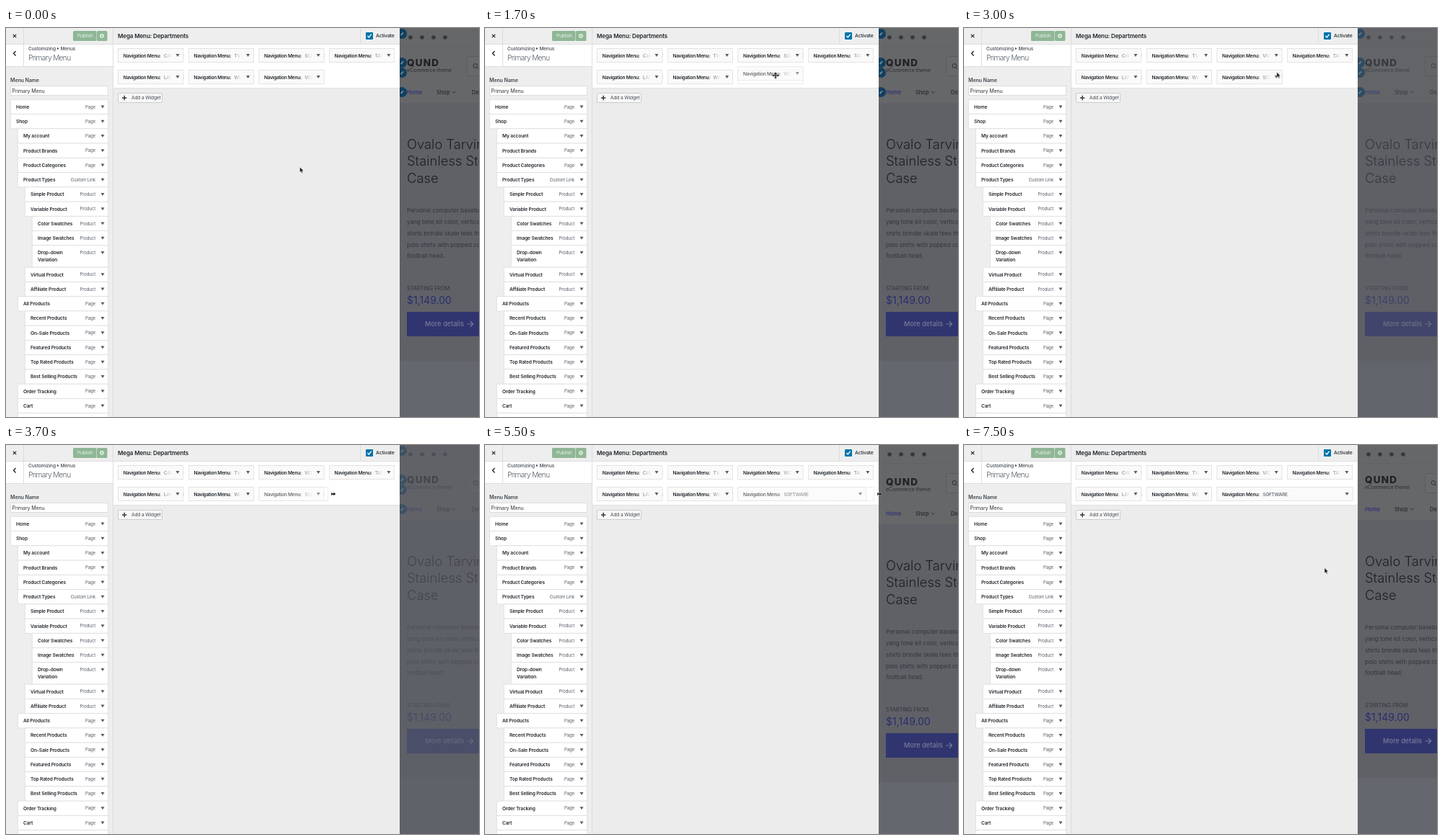
Animation of 656 by 540 pixels, one loop 7600 ms. Source, as an HTML page:

```html
<!DOCTYPE html>
<html lang="en">
<head>
<meta charset="utf-8">
<title>Mega menu editor</title>
<style>
html, body { margin: 0; width: 100%; height: 100%; overflow: hidden; background: #eee; }
#stage { display: block; width: 656px; height: 540px; font-family: Inter, "Open Sans", sans-serif; }
text { white-space: pre; letter-spacing: -.02em; }
.wide text { letter-spacing: 0; }
.tight text { letter-spacing: -.04em; }
</style>
</head>
<body>
<svg id="stage" viewBox="0 0 656 540" xmlns="http://www.w3.org/2000/svg"></svg>
<script>
const LOOP = 7600;
const INK = '#23282d';

// markup helpers; text is placed by its left edge and middle
const text = (x, y, s, size, fill = INK, weight = 400, extra = '') =>
  `<text x="${x}" y="${y + size * .36}" font-size="${size}" fill="${fill}" font-weight="${weight}" ${extra}>${s}</text>`;
const rect = (x, y, w, h, fill, extra = '') =>
  `<rect x="${x}" y="${y}" width="${w}" height="${h}" fill="${fill}" ${extra}/>`;
const box = (x, y, w, h, fill, stroke, extra = '') =>
  rect(x + .5, y + .5, w - 1, h - 1, fill, `stroke="${stroke}" ${extra}`);
const line = (d, stroke, width = 1, extra = '') =>
  `<path d="${d}" fill="none" stroke="${stroke}" stroke-width="${width}" ${extra}/>`;
const down = (x, y, fill = '#555d66') =>
  `<path d="M${x - 2.5} ${y - 2}h5l-2.5 4z" fill="${fill}"/>`;
const dot = (x, y, r, fill) => `<circle cx="${x}" cy="${y}" r="${r}" fill="${fill}"/>`;

// menu tree: depth, label, type
const items = [
  [0, 'Home', 'Page'], [0, 'Shop', 'Page'], [1, 'My account', 'Page'],
  [1, 'Product Brands', 'Page'], [1, 'Product Categories', 'Page'],
  [1, 'Product Types', 'Custom Link'], [2, 'Simple Product', 'Product'],
  [2, 'Variable Product', 'Product'], [3, 'Color Swatches', 'Product'],
  [3, 'Image Swatches', 'Product'], [3, 'Drop-down|Variation', 'Product'],
  [2, 'Virtual Product', 'Product'], [2, 'Affiliate Product', 'Product'],
  [1, 'All Products', 'Page'], [2, 'Recent Products', 'Page'],
  [2, 'On-Sale Products', 'Page'], [2, 'Featured Products', 'Page'],
  [2, 'Top Rated Products', 'Page'], [2, 'Best Selling Products', 'Page'],
  [1, 'Order Tracking', 'Page'], [1, 'Cart', 'Page'], [1, 'Checkout', 'Page']
];

function menuTree() {
  let y = 99.3, out = '';
  for (const [depth, label, type] of items) {
    const x = 6 + depth * 10, rows = label.split('|'), h = 20.25 + (rows.length - 1) * 10.1;
    out += rect(x + .25, y, 135.5 - depth * 10, h, '#fff', 'stroke="#dcdcdc" stroke-width=".8"');
    rows.forEach((row, i) => out += text(x + 8, y + 10.1 + i * 10.1, row, 6.58, INK, 600));
    out += text(124, y + 10.1, type, 6.07, '#555d66', 400, 'text-anchor="end"') + down(134, y + 10.1);
    y += h;
  }
  return out;
}

function sidebar() {
  return rect(0, 0, 149, 540, '#eee') +
    rect(0, 23, 148, 30, '#fff') +
    line('M0 22.5H148M0 53.5H148M24.5 0V53M148.5 0V540', '#ddd') +
    line('M9.8 8.8l4.4 4.4m0-4.4l-4.4 4.4', INK, 1.2) +
    line('M13.5 32l-3 3.2 3 3.2', INK, 1.4) +
    rect(93, 4, 32.5, 14, '#8fb795', 'rx="1.5"') + rect(126, 4, 14.5, 14, '#8fb795', 'rx="1.5"') +
    text(99, 11, 'Publish', 6.58, '#eaf3ec', 400) +
    `<circle cx="133" cy="11" r="1.8" fill="none" stroke="#eaf3ec" stroke-width="1.3"/>` +
    `<circle cx="133" cy="11" r="2.9" fill="none" stroke="#eaf3ec" stroke-dasharray="1.2 1.08"/>` +
    text(31, 28.5, 'Customizing', 6.58, '#444b52', 500) +
    `<path d="M71 26.7l2.5 1.8-2.5 1.8z" fill="#444b52"/>` +
    text(75.5, 28.5, 'Menus', 6.58, '#444b52', 500) +
    text(31, 41.5, 'Primary Menu', 10.1, '#555d66', 300, 'style="letter-spacing:-.06em"') +
    text(6, 72.7, 'Menu Name', 7.08, '#444b52', 600) +
    box(6, 80, 136, 14, '#fff', '#ddd') +
    text(8.5, 87, 'Primary Menu', 7.08, '#32373c') +
    menuTree();
}

function panel() {
  return rect(149, 0, 397, 540, '#ececec') +
    rect(149, 0, 397, 22, '#eee') + rect(149, 23, 397, 60.5, '#fff') +
    line('M149 22.5H546M491.5 0V22', '#ddd') + line('M149 83.5H546', '#e2e2e2') +
    text(155, 11, 'Mega Menu: Departments', 8.1, INK, 600) +
    rect(499, 6, 10, 10, '#0073aa', 'rx="1"') +
    line('M501.4 11l1.9 2 3.4-4.3', '#fff', 1.3) +
    text(513, 11, 'Activate', 6.8, INK, 500) +
    box(155, 90, 62, 14, '#f7f7f7', '#ccc', 'rx="1.5"') +
    line('M161 97h6.4m-3.2-3.2v6.4', '#32373c', 1.4) +
    text(174, 97, 'Add a Widget', 6.58, '#444b52', 400);
}

// the site behind the dark overlay; d is the extra header height, tools shows the edit buttons
function preview(d, tools) {
  const k = d / 2;
  const title = ['Ovalo Tarvin', 'Stainless Steel', 'Case'];
  const body = ['Personal computer baseball', 'yang tone kit color, vertical', 'shirts brindle skate tees the',
    'polo shirts with popped collar', 'football head.'];
  let s = rect(546, 0, 110, 540, '#666769') +
    rect(546, 104 + d, 110, 358, '#606167') + rect(546, 462 + d, 110, 80, '#65676f') +
    [561, 577, 593, 609].map(x => dot(x, 13, 2.8, '#35373c')).join('') +
    line('M546 25.5H656', '#626366') +
    text(556, 48 + k, 'QUND', 13.5, '#202126', 800, 'style="letter-spacing:1.2px"') +
    text(556, 59 + k, 'eCommerce theme', 6.9, '#2b2d32') +
    box(639, 39, 30, 28, '#68696b', '#5b5c60', 'rx="3"') +
    `<circle cx="651" cy="52.4" r="2.8" fill="none" stroke="#2d2f34"/>` + line('M653 54.5l2 2', '#2d2f34') +
    text(556, 89 + d, 'Home', 7.5, '#2b3175', 500) +
    text(597, 89 + d, 'Shop', 7.5, '#27292e', 500) +
    line(`M619 ${88 + d}l2.2 2.2 2.2-2.2`, '#27292e') +
    text(646, 89 + d, 'Deals', 7.5, '#27292e', 500);
  title.forEach((row, i) => s += text(556, 161 + d + i * 23.8, row, 18.4, '#1e1f24', 300));
  body.forEach((row, i) => s += text(556, 253.3 + d + i * 15.8, row, 8.1, '#33353b'));
  s += text(556, 361 + d, 'STARTING FROM', 7.3, '#33353b') +
    text(556, 378 + d, '$1,149.00', 14, '#282e70') +
    rect(556, 394 + d, 100, 34, '#30356f') +
    text(581, 411 + d, 'More details', 9.2, '#777a98', 500) +
    line(`M639.5 ${411 + d}h8m-3.6-3.8l3.8 3.8-3.8 3.8`, '#777a98', 1.2);
  if (tools) [8, 48, 62, 89].forEach(y => s += dot(549, y, 7, '#113f60') +
    line(`M547.5 ${y + 2}l3.6-3.6`, '#758896', 1.8));
  return s;
}

const pointers = {
  arrow: `<path d="M0 0v7.4l1.7-1.5 1.2 2.7 1.3-.6-1.2-2.6h2.3z" fill="#111" stroke="#fff" stroke-width=".5"/>`,
  move: line('M-3 0h6M0-3v6', '#111', 1.1) +
    `<path d="M0-4.6l1.8 2h-3.6zM0 4.6l1.8-2h-3.6zM-4.6 0l2-1.8v3.6zM4.6 0l-2-1.8v3.6z" fill="#111"/>`,
  resize: `<path d="M-3-2h1.2v1.1h2v-1.7L3.4 0 .2 2.6V.9h-2V2H-3z" fill="#111" stroke="#fff" stroke-width=".3"/>`
};

const names = ['CAMERAS', 'TV', 'SOFTWARE', 'TABLETS', 'LAPTOPS', 'WIRELESS', 'VIDEO'];
const SLOT_W = 91.5;
const slot = i => [155 + (i % 4) * 97.6, i < 4 ? 28 : 58];

function widget(x, y, name, w = SLOT_W, opacity = 1) {
  return `<svg class="tight" x="${x}" y="${y}" width="${w}" height="20.5" opacity="${opacity}">` +
    rect(0, 0, w, 20, '#fafafa') +
    text(7.8, 10.2, 'Navigation Menu: ', 6.58, INK, 600) +
    text(64, 10.2, name, 6.58, '#5d646b', 500) +
    rect(w - 29, 1, 11, 18, 'url(#fade)') + rect(w - 18.1, 1, 18, 18, '#fafafa') +
    down(w - 8.5, 10) + box(0, 0, w, 20, 'none', '#e2e2e2') + '</svg>';
}
const dashed = (x, y, w) => box(x, y, w, 20, '#fff', '#dcdcdc', 'stroke-dasharray="2 2"');

const stage = document.getElementById('stage');
stage.innerHTML =
  `<defs><linearGradient id="fade"><stop stop-color="#fafafa" stop-opacity="0"/><stop offset="1" stop-color="#fafafa"/></linearGradient></defs>` +
  rect(546, 0, 110, 540, '#5c6066') +
  `<g id="site" class="wide"><g id="edit">${preview(0, true)}</g><g id="tall">${preview(6)}</g><g id="short">${preview(0)}</g></g>` +
  panel() + sidebar() + '<g id="widgets"></g><g id="pointer"></g>';
const part = id => document.getElementById(id);
const show = (id, on) => part(id).setAttribute('display', on ? 'inline' : 'none');

// eased value between [time, value] keys
function at(t, keys) {
  const i = keys.findIndex(k => k[0] > t);
  if (i < 0) return keys[keys.length - 1][1];
  if (i === 0) return keys[0][1];
  const [t0, a] = keys[i - 1], [t1, b] = keys[i];
  const p = (t - t0) / (t1 - t0);
  return a + (b - a) * p * p * (3 - 2 * p);
}

const pathX = [[1000, 407.5], [1500, 403], [2250, 403], [2500, 410], [2600, 410], [3300, 449],
  [3600, 449], [3700, 454], [4500, 514], [5200, 547], [5800, 547], [6200, 501], [6650, 501], [6700, 500]];
const pathY = [[1000, 193], [1500, 71], [1600, 71], [1700, 66], [2150, 40], [2250, 40], [2500, 51],
  [2600, 51], [3300, 68], [5750, 68], [6200, 170.5]];
const innerEdge = [[3700, 441.7], [4500, 492], [5200, 523], [5500, 529]];

function drawWidgets(t, x, y) {
  const dragging = t >= 1600 && t < 2250;
  const swapped = t >= 1950;
  const resizing = t > 3700 && t < 6700;
  const order = swapped ? [0, 1, 6, 3, 4, 5, 2] : [0, 1, 2, 3, 4, 5, 6];
  let out = '', held = '';
  order.forEach((id, i) => {
    const [sx, sy] = slot(i);
    if (id === 6 && dragging) {
      out += dashed(sx, sy, SLOT_W);
      held = widget(slot(6)[0] + x - 403, 58 + y - 71, names[id], SLOT_W, .65);
    } else if (id === 2 && resizing) {
      const edge = t >= 5200 ? 540 : Math.max(441.7, Math.min(540, x - 7));
      const inner = Math.min(edge, at(t, innerEdge));
      out += dashed(sx, sy, edge - sx) + widget(sx, sy, names[id], inner - sx, .65);
    } else {
      out += widget(sx, sy, names[id], id === 2 && t >= 6700 ? 189.5 : SLOT_W);
    }
  });
  part('widgets').innerHTML = out + held;
}

function frame(now) {
  const t = now % LOOP;
  const x = at(t, pathX), y = at(t, pathY);
  drawWidgets(t, x, y);

  const kind = t >= 1400 && t < 2350 ? 'move' : t >= 3200 && t < 6700 ? 'resize' : 'arrow';
  part('pointer').innerHTML = pointers[kind];
  part('pointer').setAttribute('transform', `translate(${x} ${y})`);

  show('edit', t < 4500);
  show('tall', t >= 4500 && t < 6900);
  show('short', t >= 6900);
  part('site').setAttribute('opacity', t < 4500 ? at(t, [[2700, 1], [3200, .4]]) : 1);
  requestAnimationFrame(frame);
}
requestAnimationFrame(frame);
</script>
</body>
</html>
```
